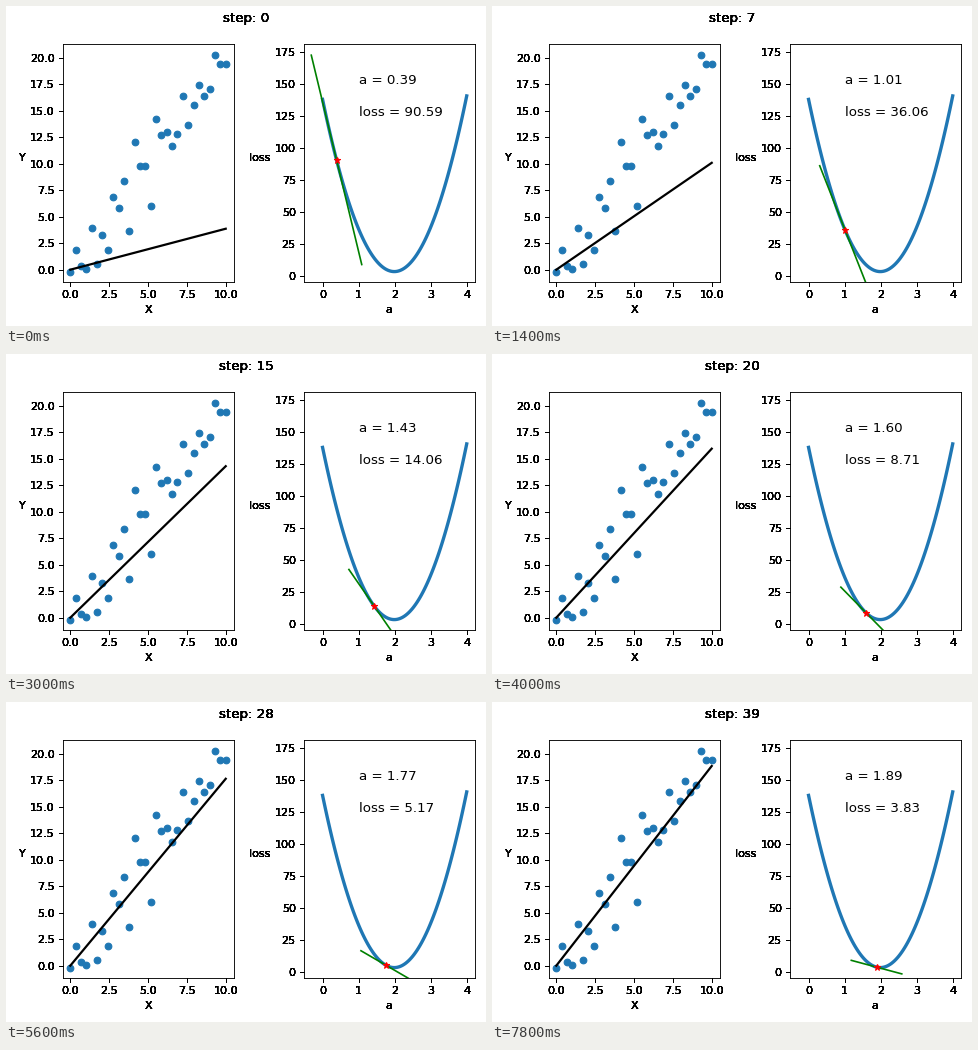
Write a matplotlib script that moves like this. It is 480 px wide and 320 px high and loops after 8 s.

```python
import numpy as np
import matplotlib.pyplot as plt
from matplotlib.animation import FuncAnimation

W, H, DPI = 480, 320, 80
STEPS, INTERVAL = 40, 200
RATE = 0.001
BEST_A, MIN_LOSS = 1.99, 3.464
START_A = BEST_A - 1.71959

X = np.linspace(0, 10, 30)
Y = [-0.18, 1.9, 0.39, 0.05, 3.98, 0.58, 3.32, 1.9, 6.91, 5.87,
     8.42, 3.7, 12.02, 9.84, 9.84, 6.06, 14.19, 12.68, 12.96, 11.73,
     12.77, 16.36, 13.62, 15.51, 17.4, 16.36, 17.03, 20.24, 19.39, 19.39]
CURVATURE = np.mean(X ** 2)


def loss(a):
    return MIN_LOSS + CURVATURE * (a - BEST_A) ** 2


def grad(a):
    return 2 * CURVATURE * (a - BEST_A)


def descend(steps):
    """Return the slope used by the last update and the value after it."""
    a = START_A
    for _ in range(steps):
        slope = grad(a)
        a -= RATE * slope
    return slope, a


def heavy(artist, times=8):
    """Draw an artist repeatedly so its soft edges turn solid."""
    draw = artist.draw

    def draw_solid(renderer):
        for _ in range(times):
            draw(renderer)

    artist.draw = draw_solid


def panel(left, xlabel, ylabel, xlim, ylim):
    top, bottom, width = 38.4, 276.4, 171
    ax = fig.add_axes([left / W, 1 - bottom / H, width / W, (bottom - top) / H])
    ax.set_xlim(*xlim)
    ax.set_ylim(*ylim)
    ax.set_xlabel(xlabel)
    ax.set_ylabel(ylabel, rotation=0, ha='right')
    heavy(ax.xaxis)
    heavy(ax.yaxis)
    return ax


fig = plt.figure(figsize=(W / DPI, H / DPI), dpi=DPI, facecolor='white')
title = fig.suptitle('', fontsize=12)
heavy(title)

fit_ax = panel(56.5, 'X', 'Y', (-0.5, 10.5), (-1.2, 21.28))
fit_ax.scatter(X, Y)
fit_line, = fit_ax.plot([], [], 'k', lw=2)

loss_ax = panel(297.5, 'a', 'loss', (-0.529, 4.216), (-4.97, 180.63))
grid = np.linspace(0, 4, 100)
loss_ax.plot(grid, loss(grid), lw=3)
tangent, = loss_ax.plot([], [], 'g')
star, = loss_ax.plot([], [], 'r*')
a_text = loss_ax.text(1, 150, '', fontsize=12)
loss_text = loss_ax.text(1, 125, '', fontsize=12)


def update(step):
    slope, a = descend(step + 1)
    value = loss(a)
    reach = np.array([-0.7, 0.7])
    title.set_text(f'step: {step}')
    fit_line.set_data(X, a * X)
    tangent.set_data(a + reach, value + slope * reach)
    star.set_data([a], [value])
    a_text.set_text(f'a = {a:.2f}')
    loss_text.set_text(f'loss = {value:.2f}')
    return title, fit_line, tangent, star, a_text, loss_text


anim = FuncAnimation(fig, update, frames=STEPS, interval=INTERVAL,
                     repeat=True, repeat_delay=0)
plt.show()
```
